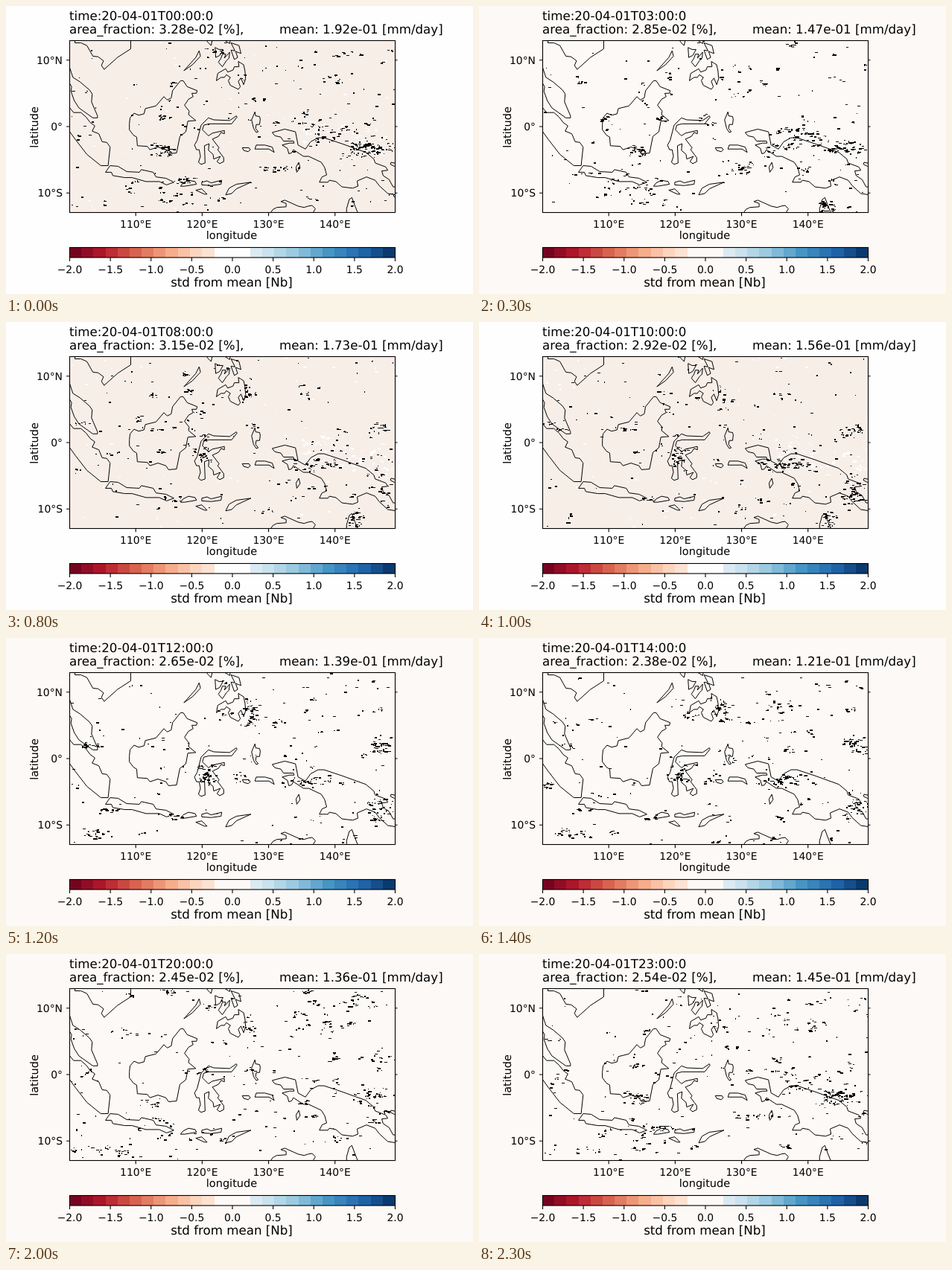
These frames come from a looping animation (627x387 px, 2.4 s). An HTML page with a canvas:

```html
<!DOCTYPE html>
<html lang="en">
<head>
<meta charset="utf-8">
<title>Hourly rain map</title>
<style>
  html, body { margin: 0; width: 100%; height: 100%; overflow: hidden; background: #fefefe; }
  canvas, svg { position: absolute; left: 0; top: 0; width: 627px; height: 387px; display: block; }
  text { font: 13.89px "DejaVu Sans", sans-serif; fill: #000; white-space: pre; text-rendering: geometricPrecision; }
  .big { font-size: 16.67px; }
  .axis { font-size: 14.5px; }
  .mid { text-anchor: middle; }
  .end { text-anchor: end; }
  .line { fill: none; stroke: #000; stroke-width: 1.1; }
  #coast path { fill: none; stroke: #000; stroke-linejoin: round; vector-effect: non-scaling-stroke; }
</style>
</head>
<body>
<canvas id="rain" width="627" height="387"></canvas>
<svg viewBox="0 0 627 387">
  <defs><clipPath id="frame"><rect x="85" y="46" width="438" height="232"/></clipPath></defs>
  <!-- coastlines: degrees east of 100°E, degrees north -->
  <g clip-path="url(#frame)">
    <g id="coast" transform="translate(85.4 161.9) scale(8.918 -8.918)">
      <!-- mainland and peninsula -->
      <path d="M.8 13.4V12.6H1.7L2.6 12.2 3.5 10.6 4.3 10.5 5.1 9.9 4.8 9.2 5.2 8.6 7.2 10.4 9.2 11.7V13.4M-.1 9.2.5 7.4 1.6 6.7 3 5.5 3.4 4.9 3.3 3.7 4.2 1.6V1.3H3.5L1.4 2.8.7 3.9.2 5.3.3 6 0 6.5"/>
      <!-- Sumatra, Java -->
      <path d="M-.3 3.2.6 2.1H1.7L2.5 1.4 3.1.6 3.8.1 3.4-.7 4.4-1.1 4.9-2.3 5.6-2.4 6.1-3.1 5.8-5.9H4.7L2.6-4.2.9-2-.7.2M8.6-6.8 10.5-6.9 10.8-6.5 12.6-6.9 13-7.6 14.5-7.8 15.7-8.4 14.6-8.8 13.5-8.3 11.5-8.3 9.4-7.7H8.3L6.5-7.4 6.3-6.9 5.4-6.9 6.1-5.9 7.3-6Z"/>
      <!-- Borneo -->
      <path d="M17.9 1.8 19 .9 17.8.8 17.5-.8 16.6-1.5 16.1-4 14.9-4.1 14.5-3.5 13.3-3.1 12.1-3.5 11.7-3 10.2-2.9 10.1-1.6 9.6-1.3 9-.5V.4L9.1 1.3 9.7 2 10.4 1.7 11.2 1.9 11.4 2.7 13 3.1 14.2 4.5 14.7 4 15.3 4.3 15.5 5.4 16.7 6.9H17.1L17.7 6 19.2 5.4 19.1 5 18.4 5 18.6 4.5 17.9 4.1 17.3 3.2 18 2.3Z"/>
      <!-- Sulawesi, Halmahera -->
      <path d="M25.2 1.4 24.4.4H21L20.2.2 20-.5 20.9-1.4 21.5-1 23.3-.6V-1.1L22.8-.9 22.4-1.5 21.5-1.9 22.5-3.2 22.3-3.5 23.2-4.7V-5.3L22.6-5.6 22.2-5.3 22.7-4.5 21.7-4.9 21.6-4.2 20.9-3.6 21-2.6 20.3-2.9 20.4-5.5 19.8-5.7 19.4-5.4 19.7-4.5 19.5-3.5H19.1L18.8-2.8 19.2-2.1 19.8.2 20.9 1.3 21.7 1 24.1.9 25.1 1.6ZM28.7 1.1 28.6.3H28.1L28-.3 28.4-.8 28.1-.9 27.7-.3 27.4 1 27.9 2.2 28 1.6 28.6 1.5Z"/>
      <!-- small southern islands -->
      <path d="M29.4-2.8 30.5-3.1 30.8-3.9 30-3.4 27.9-3.4 28.1-2.8ZM26.9-3.8 26.2-3.6 26-3.2H27L27.2-3.5ZM17.9-8.1 18.9-8.3 19.1-8.7 17.3-9H16.7L17.1-8.5ZM22.9-8.1 22.8-8.7 21.3-8.9 19.9-8.8V-8.4L20.7-8.2 21.3-8.5ZM20.7-10.2H20.3L19-9.6 19.9-9.4ZM24.4-10.1 23.5-10.3 24-9.3 25.1-8.7 27.3-8.4 25.1-9.4ZM34.2-6.9 34.1-6.1 34.5-5.4 34.7-6.2Z"/>
      <!-- Philippines -->
      <path d="M18.5 9.3 17.2 8.4 19 10.4 19.5 11.4 19.7 10.6ZM21.9 11.9 22.5 11.6H23.1L22.6 10.7 22 10.4ZM25.5 12.2 25.8 11 25 11.3 25.3 10.4 24.8 10.1 24.3 11.5 24.9 11.4 24.3 12.6ZM24 10.3 23.6 9.9 23 9 22.4 9.7 22.8 10.3 23 10.9H23.5L23.3 10.3 24.1 11.2ZM21.5 13.1 21.3 12.2 20.8 12.7 20.3 13.5M24.2 13 24.1 12.5 23.3 13"/>
      <path d="M26.4 8.4 26.5 7.2 26.2 6.3 25.8 7.3 25.4 6.8 25.7 6 25.4 5.6 24.2 6.2 23.9 6.9 24.2 7.4 23.6 7.8 23.3 7.4H22.8L22.1 6.9 22.3 8 23.5 8.7 23.8 8.2 24.6 8.5 24.8 9H25.5L25.4 9.8 26.2 9.3Z"/>
      <!-- New Guinea and neighbour -->
      <path d="M49.8-10.4 47.9-10.1 46.6-8.9 46-8.1 44.7-7.6 43.3-8.2 43.4-9 42.6-9.3 41-9.1 40.1-8.3 39.1-8.1 38.9-8.4H37.6L38-7.6 38.7-7.3 38.4-6.2 37.9-5.4 36-4.5H35.2L33.7-3.5 33.4-4 33-4.1 32.8-3.3 32-2.8 33.1-2.5H33.8L33.7-2.2H32.2L31.8-1.6 30.9-1.4 30.5-.9 32.4-.4 34-.8 34.4-2.8 35.5-3.4 36.3-2.3 37.4-1.7H38.3L41-2.6 44.6-3.9 45.8-4.9 46-5.5 47.6-6.1 47.9-6.6 47-6.7 47.2-7.4 48.1-8 48.7-9.1H49.3M49.7-6.3 48.9-6 48.3-5.7 48.4-5.4 49.3-5.6"/>
      <!-- northern Australia -->
      <path d="M30.2-13.1 30.6-12.5 31.2-12.2 32.6-12.1V-11.6L31.8-11.3 32.4-11.1 34.4-12 35.3-12.2 35.9-12 36.5-11.9 37-12.4 36.7-12.9M43.5-13.3 42.9-11.8 42.5-10.7 42.1-11 41.7-12.4V-13"/>
    </g>
  </g>
  <g id="bar" shape-rendering="crispEdges"></g>
  <rect class="line" x="85.5" y="46.5" width="437" height="231"/>
  <rect class="line" x="85.5" y="324.5" width="437" height="13.5"/>
  <path id="ticks" class="line"/>
  <g id="labels"></g>
  <text id="clock" class="big" x="85" y="19"></text>
  <text id="stats" class="big" x="85" y="37"></text>
  <text class="axis mid" x="303" y="313">longitude</text>
  <text class="axis mid" transform="translate(43 163) rotate(-90)">latitude</text>
  <text class="big mid" x="303" y="377">std from mean [Nb]</text>
</svg>
<script>
const $ = id => document.getElementById(id);
const ctx = $('rain').getContext('2d');
const PAPER = '#fefefe', CREAM = '#fdf9f6', LAND = '#f7eee8';
const LEFT = 85.5, TOP = 46.5, WIDE = 437, HIGH = 231, DEGREE = 8.918;
const mix = (a, b, w) => a + (b - a) * w;

function add(parent, tag, attrs, label = '') {
  const el = document.createElementNS('http://www.w3.org/2000/svg', tag);
  for (const key in attrs) el.setAttribute(key, attrs[key]);
  el.textContent = label;
  parent.append(el);
}

// diverging red to blue scale; the middle stays open to the page
const ramp = '67001f b2182b d6604d f4a582 fddbc7 f7f7f7 d1e5f0 92c5de 4393c3 2166ac 053061'
  .split(' ').map(hex => [0, 2, 4].map(i => parseInt(hex.slice(i, i + 2), 16)));

function rampColour(t) {
  const pos = t * (ramp.length - 1), i = Math.floor(pos);
  return `rgb(${ramp[i].map((c, k) => Math.round(mix(c, ramp[i + 1][k], pos - i)))})`;
}

function drawBar(steps) {
  for (let i = 0; i < steps; i++) {
    const t = (i + 0.5) / steps;
    if (Math.abs(t - 0.5) < 0.045) continue;
    add($('bar'), 'rect', { x: 85 + i * WIDE / steps, y: 324, width: WIDE / steps + 0.5, height: 14, fill: rampColour(t) });
  }
}

function drawScales() {
  let path = '';
  const label = (x, y, side, name) => add($('labels'), 'text', { x, y, class: side }, name);
  for (let lon = 10; lon <= 40; lon += 10) {
    const x = LEFT - 0.5 + lon * DEGREE;
    path += `M${x} 277v5.3`;
    label(x, 298, 'mid', `${100 + lon}°E`);
  }
  for (const lat of [10, 0, -10]) {
    const y = 162 - lat * DEGREE;
    path += `M85 ${y}h-4M522 ${y}h3.5`;
    label(76, Math.round(y + 5), 'end', Math.abs(lat) + '°' + (lat > 0 ? 'N' : lat < 0 ? 'S' : ''));
  }
  for (let v = -2; v <= 2; v += 0.5) {
    const x = LEFT + (v + 2) / 4 * WIDE;
    path += `M${x} 338v5`;
    label(x, 359, 'mid', (v < 0 ? '−' : '') + Math.abs(v).toFixed(1));
  }
  $('ticks').setAttribute('d', path);
}

let seed = 20;
function rnd() {
  seed = (seed + 0x6d2b79f5) >>> 0;
  let t = Math.imul(seed ^ seed >>> 15, seed | 1);
  t ^= t + Math.imul(t ^ t >>> 7, t | 61);
  return ((t ^ t >>> 14) >>> 0) / 4294967296;
}
const bell = () => (rnd() + rnd() + rnd() - 1.5) * 1.35;

// a cell is a few stacked runs of pixels that lives a short while around its hour
function cell(x, y, hour, size) {
  const runs = [];
  for (let i = 0; i < size; i++) {
    runs.push([Math.round(x), Math.round(y), 1 + Math.floor(rnd() * 4), rnd() < 0.45 ? 2 : 1]);
    x += bell() * 3;
    y += bell() * 2;
  }
  return { runs, hour, life: 1 + rnd() };
}

const cells = [];
function storm(x, y, rx, ry, count, peak, span = 5) {
  for (let i = 0; i < count * span / 1.7; i++) {
    const size = 1 + Math.floor(rnd() * 3);
    cells.push(cell(x + bell() * rx, y + bell() * ry, peak + bell() * span, size));
  }
}

// lasting rain areas: place, spread, cells at the peak, peak hour
storm(211, 194, 10, 6, 26, 1, 3);
storm(486, 190, 24, 9, 70, 1, 4);
storm(432, 172, 22, 8, 26, 2);
storm(235, 145, 24, 26, 18, 7, 4);
storm(268, 182, 10, 11, 22, 12);
storm(415, 191, 25, 6, 36, 11);
storm(501, 228, 13, 15, 34, 13);
storm(466, 267, 8, 7, 20, 6);
storm(326, 96, 7, 12, 20, 15, 8);
storm(402, 92, 24, 18, 24, 17, 6);
storm(470, 62, 26, 8, 18, 19, 4);
storm(503, 142, 12, 7, 24, 13, 6);
storm(135, 263, 32, 6, 20, 17);
storm(352, 217, 20, 6, 16, 3);
storm(220, 240, 40, 16, 24, 2);

// passing showers and single drops
for (let i = 0; i < 130; i++) {
  storm(LEFT + rnd() * WIDE, TOP + rnd() * HIGH, 8, 4, 5, rnd() * 24, 2);
}
for (let i = 0; i < 700; i++) {
  cells.push(cell(LEFT + rnd() * WIDE, TOP + rnd() * HIGH, rnd() * 24, 1));
}

// dry streaks north of New Guinea, visible on the tinted map
const dry = [];
for (let i = 0; i < 420; i++) {
  const along = rnd();
  dry.push(cell(mix(395, 520, along), mix(168, 190, along) + bell() * 16, rnd() * 24, 3));
}
for (let i = 0; i < 500; i++) {
  dry.push(cell(LEFT + rnd() * WIDE, TOP + rnd() * HIGH, rnd() * 24, 1));
}

function paint(list, hour, colour) {
  ctx.fillStyle = colour;
  for (const { runs, hour: at, life } of list) {
    const gap = Math.abs((at - hour + 36) % 24 - 12);
    if (gap < life) runs.forEach(run => ctx.fillRect(...run));
  }
}

// hour, area fraction and mean rain
const readings = [[0, 3.28, 1.92], [3, 2.85, 1.47], [6, 3.38, 1.91], [10, 2.92, 1.56],
  [14, 2.38, 1.21], [17, 2.36, 1.27], [23, 2.54, 1.45]];

function reading(hour) {
  const i = Math.max(1, readings.findIndex(r => r[0] >= hour));
  const a = readings[i - 1], b = readings[i];
  return a.map((v, k) => mix(v, b[k], (hour - a[0]) / (b[0] - a[0])));
}

function draw(hour) {
  const [, area, mean] = reading(hour);
  const tinted = mean > 1.5;
  ctx.fillStyle = tinted ? PAPER : CREAM;
  ctx.fillRect(0, 0, 627, 387);
  ctx.save();
  ctx.beginPath();
  ctx.rect(86, 47, 436, 230);
  ctx.clip();
  if (tinted) {
    ctx.fillStyle = LAND;
    ctx.fillRect(86, 47, 436, 230);
    paint(dry, hour, PAPER);
  }
  paint(cells, hour, '#000');
  ctx.restore();
  $('clock').textContent = `time:20-04-01T${String(hour).padStart(2, '0')}:00:0`;
  $('stats').textContent = `area_fraction: ${area.toFixed(2)}e-02 [%],` +
    ' '.repeat(9) + `mean: ${mean.toFixed(2)}e-01 [mm/day]`;
}

drawBar(27);
drawScales();
let shown = -1;
function tick() {
  const hour = Math.floor(performance.now() % 2400 / 100);
  if (hour !== shown) draw(shown = hour);
  requestAnimationFrame(tick);
}
tick();
</script>
</body>
</html>
```
